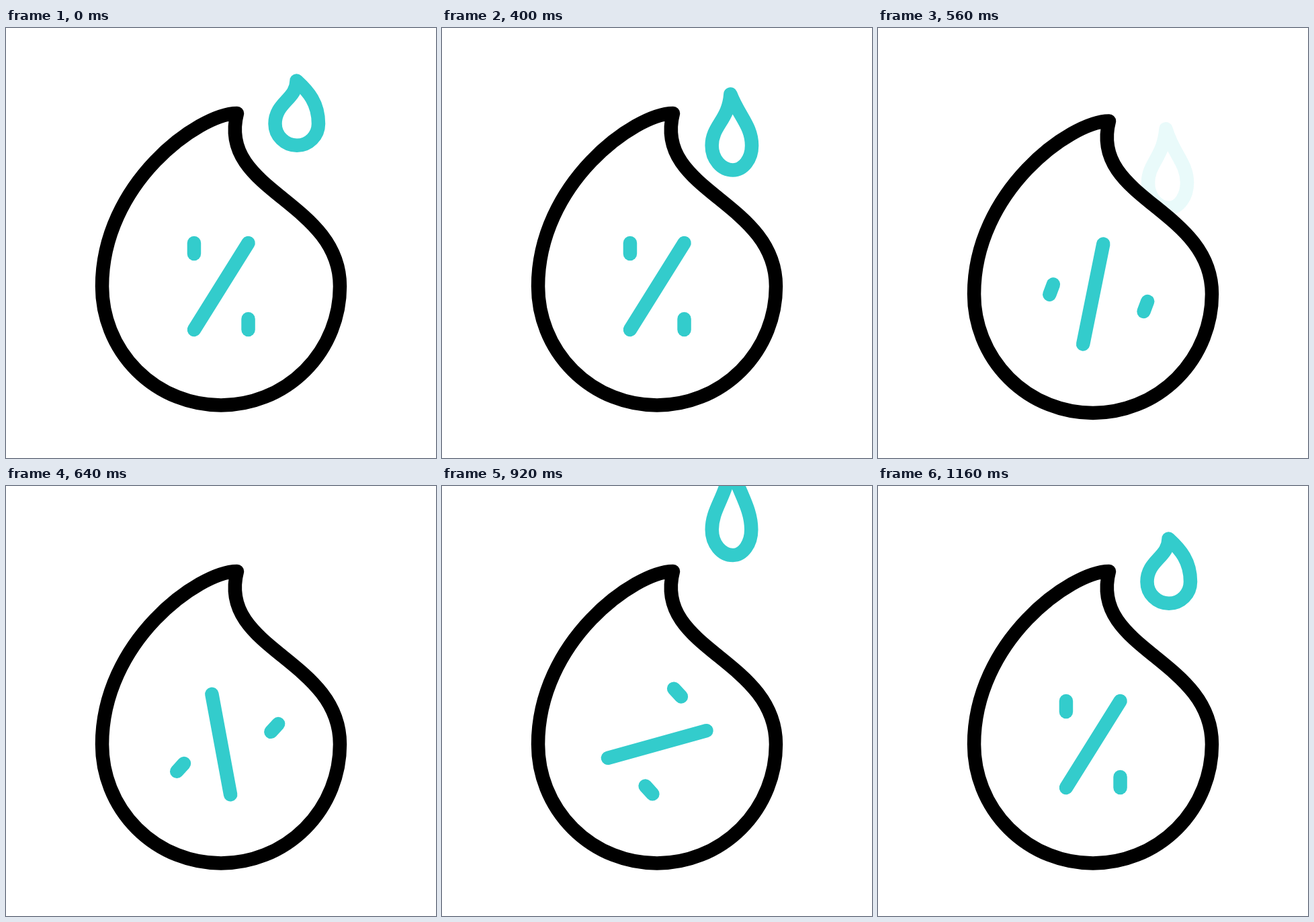
Animation of 640x640 px, one loop 1.48 s. Source, as an HTML page with a canvas:

```html
<!DOCTYPE html>
<html lang="en">
<head>
<meta charset="utf-8">
<title>Humidity</title>
<style>
  html, body { margin: 0; width: 100%; height: 100%; overflow: hidden; background: #fff; }
  canvas { display: block; width: 100vmin; height: 100vmin; }
</style>
</head>
<body>
<canvas id="stage" width="640" height="640"></canvas>
<script>
const ctx = document.getElementById('stage').getContext('2d');
const LOOP = 1480, STEP = 40;
const TEAL = '#33cccc', BLACK = '#000';
const CX = 320.25, CY = 384.5, DROP_X = 433;

const clamp = x => Math.min(1, Math.max(0, x));
const ease = (t, a, b) => { const s = clamp((t - a) / (b - a)); return s * s * (3 - 2 * s); };

// Smooth curve through [time, value] keys, at rest at both ends.
function track(keys, t) {
  const n = keys.length - 1;
  if (t <= keys[0][0]) return keys[0][1];
  if (t >= keys[n][0]) return keys[n][1];
  const i = keys.findIndex(k => k[0] > t) - 1;
  const slope = j => j === 0 || j === n ? 0
    : (keys[j + 1][1] - keys[j - 1][1]) / (keys[j + 1][0] - keys[j - 1][0]);
  const [t0, v0] = keys[i], [t1, v1] = keys[i + 1];
  const d = t1 - t0, s = (t - t0) / d;
  return v0 + (v1 - v0) * s * s * (3 - 2 * s)
    + d * slope(i) * s * (1 - s) ** 2 - d * slope(i + 1) * s * s * (1 - s);
}

function route(d) {
  const p = document.createElementNS('http://www.w3.org/2000/svg', 'path');
  p.setAttribute('d', d);
  const len = p.getTotalLength();
  return s => p.getPointAtLength(s * len);
}

// Two-part orbits of the percent dots, relative to the sign's centre.
const orbits = [
  [route('M-40.3-56.5C-59.2-17.5-85 21.6-40.3 61'),
   route('M-40.3 61C-25 73 13.5 68 40.3 56.5')],
  [route('M40.3 56.5C79.5 48 97-11 65.3-56.2'),
   route('M65.3-56.2C48-84-15-88-40.3-56.5')]
];

const bigDrop = new Path2D(
  'M344 127C314 243 497 257 497 384.5A177 177 0 0 1 143 384.5C143 232 286 127.5 344 127Z');

// Small drop poses: tip, left handles, left, bottom, right, right handles.
const REST = [432.5, -64, 432.5, -36.5, 400.5, -31.5, 400.5, 32.3, 465, 465, -31, 450, -48];
const FALL = [428.5, -80, 425, -38, 402, -29, 402, 37.5, 460, 460, -29, 440, -42];
const LONG = [430, -103, 426, -55, 401.5, -35, 401.5, 37.5, 461, 461, -35, 443, -62];

function dropState(t) {
  if (t < 620) {
    const m = ease(t, 120, 520);
    return {
      pose: REST.map((v, i) => v + (FALL[i] - v) * m),
      y: 142.5 + 56.5 * Math.pow(Math.max(0, t - 120) / 360, 2.2),
      alpha: 1 - ease(t, 400, 600)
    };
  }
  return {
    pose: REST.map((v, i) => track([[640, FALL[i]], [800, FALL[i]], [1000, LONG[i]], [1160, v]], t)),
    y: track([[640, -50], [800, 8.5], [1000, 100], [1160, 142.5]], t),
    alpha: 1
  };
}

function drawDrop(t) {
  const { pose, y, alpha } = dropState(t);
  if (alpha <= 0) return;
  const [tx, ty, ax, ay, bx, by, left, low, right, cx, cy, dx, dy] = pose;
  const k = 0.5523;
  ctx.save();
  ctx.translate(0, y);
  ctx.globalAlpha = alpha;
  ctx.strokeStyle = TEAL;
  ctx.beginPath();
  ctx.moveTo(tx, ty);
  ctx.bezierCurveTo(ax, ay, bx, by, left, 0);
  ctx.bezierCurveTo(left, low * k, DROP_X + (left - DROP_X) * k, low, DROP_X, low);
  ctx.bezierCurveTo(DROP_X + (right - DROP_X) * k, low, right, low * k, right, 0);
  ctx.bezierCurveTo(cx, cy, dx, dy, tx, ty);
  ctx.closePath();
  ctx.stroke();
  ctx.restore();
}

function bar(x, y, angle, hx, hy) {
  ctx.save();
  ctx.translate(x, y);
  ctx.rotate(angle);
  ctx.beginPath();
  ctx.moveTo(-hx, -hy);
  ctx.lineTo(hx, hy);
  ctx.stroke();
  ctx.restore();
}

function drawSign(t) {
  const turn = Math.PI * ease(t, 400, 1160);
  ctx.strokeStyle = TEAL;
  bar(CX, CY, -turn, 40.3, -64.5);
  for (const [first, second] of orbits) {
    const p = t < 760 ? first(ease(t, 400, 760)) : second(ease(t, 760, 1160));
    bar(CX + p.x, CY + p.y, turn, 0, 8);
  }
}

function draw(t) {
  ctx.fillStyle = '#fff';
  ctx.fillRect(0, 0, 640, 640);
  ctx.lineWidth = 20.5;
  ctx.lineCap = ctx.lineJoin = 'round';
  drawDrop(t);
  ctx.save();
  ctx.translate(0, track([[400, 0], [520, 15.5], [640, 0]], t));
  ctx.strokeStyle = BLACK;
  ctx.stroke(bigDrop);
  drawSign(t);
  ctx.restore();
}

function tick() {
  const t = performance.now() % LOOP;
  draw(Math.floor(t / STEP) * STEP);
  requestAnimationFrame(tick);
}
tick();
</script>
</body>
</html>
```
